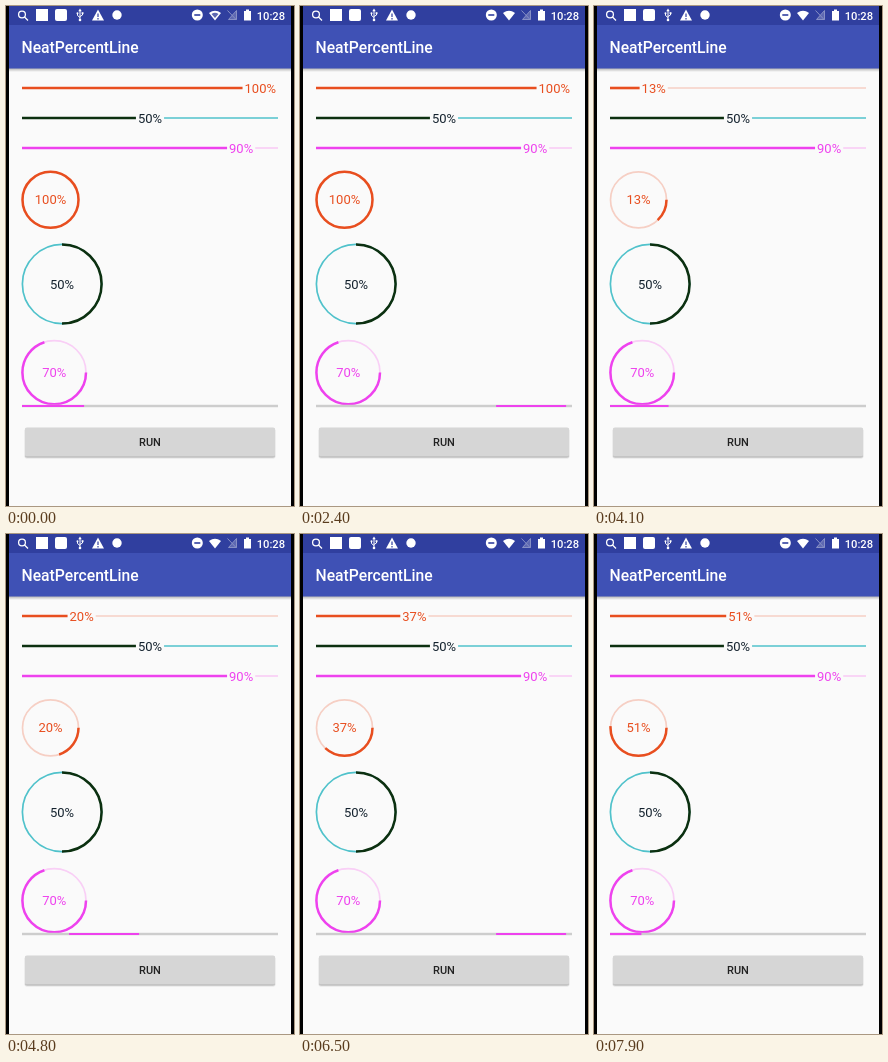
Animation, 288 px wide and 500 px high, one loop 8000 ms. Source, as an HTML page:

```html
<!DOCTYPE html>
<html lang="en">
<head>
<meta charset="utf-8">
<title>Progress bars</title>
<style>
  html, body { margin: 0; width: 100%; height: 100%; overflow: hidden; background: #fafafa; }
  svg { display: block; font-family: Roboto, "Noto Sans", sans-serif; font-size: 13px; }
  .medium { font-weight: 500; }
</style>
</head>
<body>
<svg id="stage" width="288" height="500" viewBox="0 0 288 500">
  <defs>
    <linearGradient id="shade" x2="0" y2="1">
      <stop stop-color="#000" stop-opacity=".3"/>
      <stop offset="1" stop-color="#000" stop-opacity="0"/>
    </linearGradient>
  </defs>
  <rect width="288" height="500" fill="#fafafa"/>
  <rect y="62" width="288" height="4" fill="url(#shade)"/>
  <rect y="18" width="288" height="44.5" fill="#3f51b5"/>
  <rect width="288" height="19" fill="#303f9f"/>

  <!-- status icons -->
  <g fill="#fff">
    <g fill="none" stroke="#fff" stroke-width="1.3">
      <circle cx="16" cy="8.5" r="3.4"/>
      <path d="M18.5 11L22 14.5"/>
    </g>
    <rect x="30" y="3" width="12" height="12"/>
    <rect x="49" y="3" width="12" height="12" rx="2"/>
    <g fill="none" stroke="#fff">
      <path d="M74 4V14M71.5 7.5V9.5L74 11.5M76.5 7V9L74 10.5"/>
    </g>
    <path d="M74 2.5L72.3 5.3H75.7Z"/>
    <circle cx="74" cy="14" r="1.3"/>
    <circle cx="71.5" cy="7.3" r="1"/>
    <rect x="75.6" y="6.2" width="1.9" height="1.9"/>
    <path d="M92 3.5L98 14.5H86Z"/>
    <path d="M92 7.5V11M92 12V13.4" stroke="#303f9f" stroke-width="1.2"/>
    <circle cx="111" cy="9" r="4.7"/>
    <circle cx="191.3" cy="9" r="5.5"/>
    <path d="M188.3 9H194.3" stroke="#303f9f" stroke-width="1.6"/>
    <path d="M203 7Q209 2.5 215 7L209 14.5Z"/>
    <path id="weak" d="M205.5 8Q209 5.5 212.5 8L209 12Z" fill="#5e69b2"/>
    <g fill="none" stroke="#8790c5">
      <path d="M222.5 13.5H230.5V4.5Z" fill="#5e69b2"/>
      <path d="M221.5 4.5L230.5 14"/>
    </g>
    <path d="M238 5H240V3.5H243V5H245V14.5H238Z"/>
    <text class="medium" x="250.7" y="13.5" font-size="11.2">10:28</text>
    <text class="medium" x="15.5" y="47" font-size="15.7">NeatPercentLine</text>
  </g>

  <g id="gauges"></g>

  <path d="M16 400H272" stroke="#cdcdcd" stroke-width="2.5"/>
  <path id="runner" stroke="#ee42ee" stroke-width="2.2"/>

  <rect x="18.5" y="422.5" width="251" height="30" rx="2" fill="#000" opacity=".1"/>
  <rect x="19" y="422" width="250" height="29.5" rx="2" fill="#000" opacity=".2"/>
  <rect x="19" y="421.5" width="250" height="29" rx="1.6" fill="#d6d6d6"/>
  <text class="medium" x="144" y="440" font-size="11" text-anchor="middle" fill="#222">RUN</text>

  <path d="M0 0H3V500H0ZM285 0H288V500H285Z"/>
</svg>
<script>
const LOOP = 8000, LEFT = 16, RIGHT = 272, SEGMENT = 70;
const RUN_AT = 2822, RATE = 0.0102; // percent per ms
// Head of the running segment: [ms, distance]
const HEAD = [[0, 78], [2400, 266], [3400, 342], [4800, 459], [6500, 592], [8000, 707]];

const byId = id => document.getElementById(id);
const gauges = byId("gauges");

function add(tag, attrs) {
  const el = document.createElementNS("http://www.w3.org/2000/svg", tag);
  for (const key in attrs) el.setAttribute(key, attrs[key]);
  return gauges.appendChild(el);
}

function makeBar(y, color, rest, ink = color) {
  const after = add("path", { stroke: rest, "stroke-width": 1.7 });
  const done = add("path", { stroke: color, "stroke-width": 2.6 });
  const label = add("text", { y: y + 4.6, fill: ink });
  return percent => {
    label.textContent = percent + "%";
    const width = label.getComputedTextLength();
    const x = LEFT + (RIGHT - LEFT - width - 4) * percent / 100;
    const next = Math.min(RIGHT, x + width + 4);
    label.setAttribute("x", x + 2);
    done.setAttribute("d", `M${LEFT} ${y}H${x}`);
    after.setAttribute("d", `M${next} ${y}H${RIGHT}`);
  };
}

function makeRing(cx, cy, r, start, color, rest, ink = color) {
  const ring = { cx, cy, r, fill: "none" };
  add("circle", { ...ring, stroke: rest, "stroke-width": 1.7 });
  const arc = add("circle", {
    ...ring, stroke: color, "stroke-width": 2.5, pathLength: 100,
    transform: `rotate(${start} ${cx} ${cy})`
  });
  const label = add("text", { x: cx, y: cy + 4.6, fill: ink, "text-anchor": "middle" });
  return percent => {
    label.textContent = percent + "%";
    arc.setAttribute("stroke-dasharray", `${percent} ${100 - percent}`);
    arc.setAttribute("visibility", percent ? "visible" : "hidden");
  };
}

const ORANGE = ["#e84e1f", "#f6cfc4"];
const GREEN = ["#0c3010", "#50c2cb", "#14222e"];
const PINK = ["#ee42ee", "#f9cff6"];

const bar = makeBar(82, ...ORANGE);
makeBar(112, ...GREEN)(50);
makeBar(142, ...PINK)(90);
const ring = makeRing(44.5, 193.8, 28, 0, ...ORANGE);
makeRing(56, 278, 39.6, -90, ...GREEN)(50);
makeRing(48.2, 366.5, 31.8, 0, ...PINK)(70);

function headAt(t) {
  const i = HEAD.findIndex(([time]) => time > t);
  const [t0, d0] = HEAD[i - 1], [t1, d1] = HEAD[i];
  const distance = d0 + (d1 - d0) * (t - t0) / (t1 - t0);
  return LEFT + (distance - LEFT) % (RIGHT - LEFT + SEGMENT);
}

function draw(now) {
  const t = Math.max(0, now) % LOOP;
  const percent = t < RUN_AT ? 100 : Math.floor((t - RUN_AT) * RATE);
  bar(percent);
  ring(percent);

  const head = headAt(t);
  byId("runner").setAttribute("d",
    `M${Math.max(LEFT, head - SEGMENT)} 400H${Math.min(RIGHT, head)}`);
  byId("weak").setAttribute("visibility", t < 900 ? "visible" : "hidden");
}

const begin = performance.now();
function tick() {
  draw(performance.now() - begin);
  requestAnimationFrame(tick);
}
tick();
</script>
</body>
</html>
```
